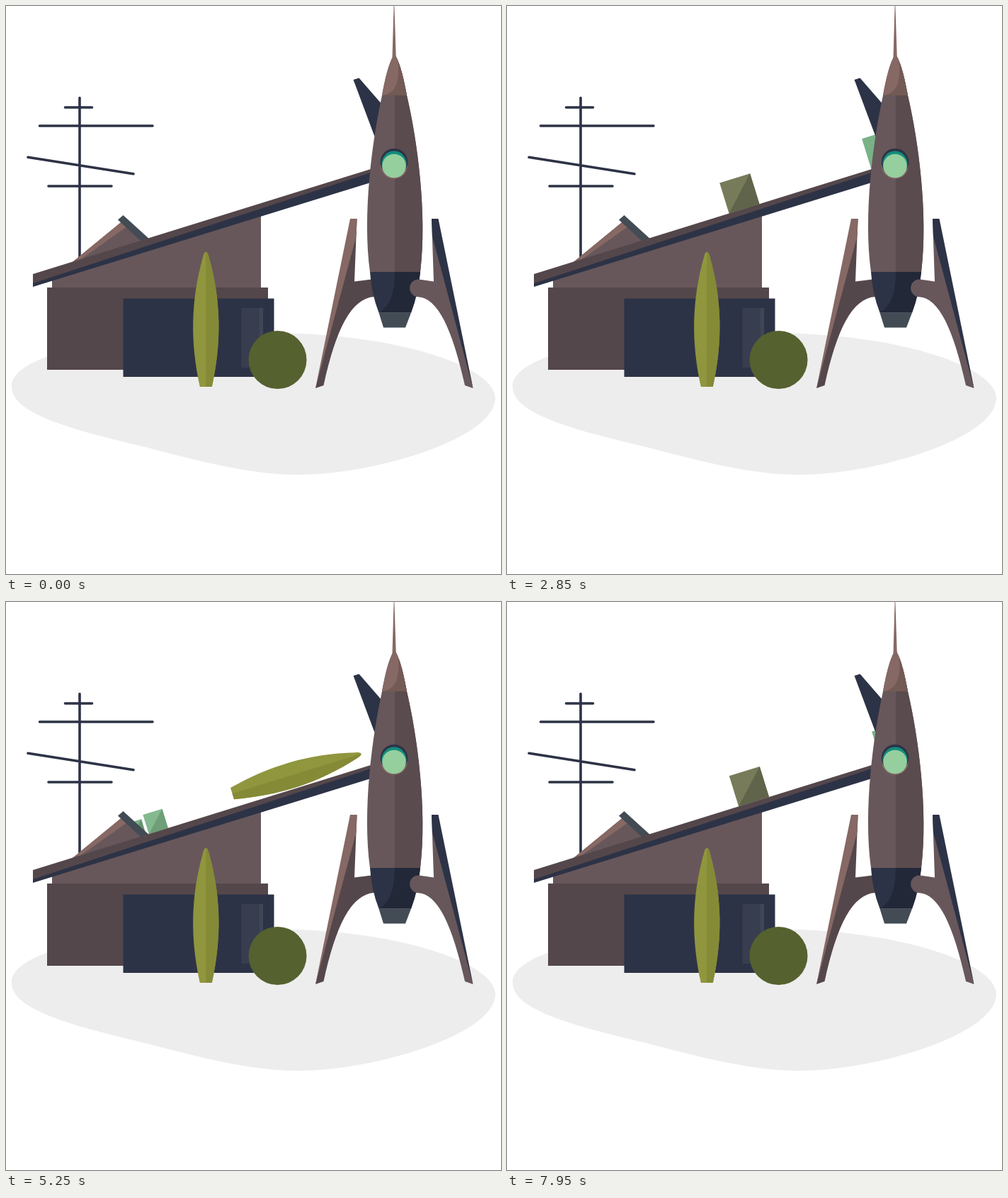
These frames come from a looping animation (699 by 801 pixels, 8000 ms). An HTML page with a canvas:

```html
<!DOCTYPE html>
<html lang="en">
<head>
<meta charset="utf-8">
<title>Rocket loading ramp</title>
<style>
html, body { margin: 0; width: 100%; height: 100%; overflow: hidden; background: #fff; }
canvas { display: block; }
</style>
</head>
<body>
<canvas id="stage" width="699" height="801"></canvas>
<script>
const ctx = document.getElementById('stage').getContext('2d');

const LOOP = 8;
const SPEED = 134.5;
const START_X = 178.2;
const TILT = Math.atan2(148, 477);
const NAVY = '#2d3346', PLUM = '#67575b', DARK = '#54474b', ROSE = '#866864', STEEL = '#434b54';

const rampY = x => 378 - (x - 38) * 148 / 477;

function fill(color, d) {
  ctx.fillStyle = color;
  ctx.fill(new Path2D(d));
}

function rect(color, x, y, w, h) {
  ctx.fillStyle = color;
  ctx.fillRect(x, y, w, h);
}

function disc(color, x, y, r) {
  ctx.fillStyle = color;
  ctx.beginPath();
  ctx.arc(x, y, r, 0, 2 * Math.PI);
  ctx.fill();
}

// Grows from 0 to 1 with a small overshoot
function pop(age) {
  const q = Math.min(age / 0.45, 1) - 1;
  return 1 + 2.4 * q ** 3 + 1.4 * q * q;
}

function smooth(a, b, t) {
  const p = Math.max(0, Math.min(1, (t - a) / (b - a)));
  return p * p * (3 - 2 * p);
}

const GREEN = ['#79b287', '#62956b'];
const MINT = ['#84b990', '#6e9f78'];
const OLIVE = ['#777b5a', '#60644a'];

const boxes = [
  { at: 0.191, size: 45, colors: GREEN },
  { at: 1.685, size: 45, colors: OLIVE },
  { at: 5.187, size: 45, colors: GREEN },
  { at: 4.975, size: 26.5, colors: MINT },
  { at: 6.684, size: 45, colors: OLIVE }
];

function drawBox({ at, size, colors }, t) {
  const age = t - at;
  const x = START_X + SPEED * age;
  if (age <= 0 || x > 560) return;
  const k = pop(age) * size, h = k / 2;
  ctx.save();
  ctx.translate(x, rampY(x));
  ctx.rotate(-TILT);
  rect(colors[0], -h, -k, k, k);
  fill(colors[1], `M${h} ${-k}V0H${-h}Z`);
  ctx.restore();
}

function treeShape() {
  fill('#90963d', 'M-8.5 0C-22 -62 -22 -120 -4 -184C-2 -192.5 2 -192.5 4 -184C22 -120 22 -62 8.5 0Z');
  fill('#858a37', 'M0 0V-190.5Q2.3 -190 4 -184C22 -120 22 -62 8.5 0Z');
}

function drawCargoTree(t) {
  const age = t - 3.18;
  if (age <= 0 || t > 7) return;
  const u = t - 5.25;
  const x = 429.3 + 145.2 * u - 3.4 * u * u;
  const y = 236.3 - 0.306 * (x - 429.3);
  const tilt = 28 - 10.9 * smooth(3.8, 4.8, t);
  const k = pop(age);
  ctx.save();
  ctx.translate(x, y);
  ctx.rotate((90 - tilt) * Math.PI / 180);
  ctx.scale(k, k);
  ctx.translate(0, 115);
  treeShape();
  ctx.restore();
}

function drawCargo(t) {
  ctx.save();
  ctx.beginPath();
  ctx.rect(178, 100, 370, 300);
  ctx.clip();
  boxes.forEach(b => drawBox(b, t));
  ctx.restore();

  ctx.save();
  ctx.beginPath();
  ctx.rect(90, 100, 458, 300);
  ctx.clip();
  drawCargoTree(t);
  ctx.restore();
}

function drawGround() {
  fill('#ededed', 'M8 537C8 500 100 462 380 461C560 463 691 510 691 553C691 610 520 661 412 661C330 661 240 632 180 618C80 594 8 572 8 537Z');
}

function drawAntenna() {
  ctx.strokeStyle = NAVY;
  ctx.lineWidth = 3.6;
  ctx.lineCap = 'round';
  ctx.stroke(new Path2D('M104 129.5V360M83.5 143H121.5M47.5 169H207M31 213.3L180 236.8M60 254H149'));
}

function drawHouse() {
  // Tunnel
  fill(PLUM, 'M94 361L163 304.5L200 332L150 356Z');
  fill(ROSE, 'M94 361L163 304.5L171 311L106 357Z');
  fill(STEEL, 'M158 301.5L165.5 295L204 330L190 331Z');
  // Walls and ramp
  fill(PLUM, 'M65 398V380L360 288V398Z');
  fill(NAVY, 'M38 390L515 234V249L38 396Z');
  fill(DARK, 'M38 378L515 230V235L38 391Z');
  rect(DARK, 58, 397, 312, 116);
  rect(NAVY, 165.5, 412.5, 213, 110.5);
  rect('#383d50', 332.5, 426, 30.5, 84);
  rect('#3f4755', 358, 426, 5, 84);
  // Plants
  ctx.save();
  ctx.translate(282.3, 537);
  treeShape();
  ctx.restore();
  disc('#55612f', 383.5, 499, 41);
}

function drawRocket() {
  const body = 'M547 70C540 82 535 104 531 126C517 190 503 294 514 375H585C595 294 581 190 566 126C562 104 557 82 550 70Z';
  fill(NAVY, 'M490.5 104L498.5 101.5L532 140L520.5 184Z');

  // Left leg
  fill(DARK, 'M495.5 300L492 388.5Q503 387 520 385V410C488 412 466 455 448.5 535L437 539Z');
  fill(ROSE, 'M486 300H495.8L494.5 325L437 539Z');

  // Hull
  fill(PLUM, body);
  ctx.save();
  ctx.clip(new Path2D(body));
  rect('#594b4e', 549, 60, 50, 320);
  rect(ROSE, 520, 60, 60, 66);
  fill('#745a55', 'M553 70C556 100 555 123 531 126H570V70Z');
  ctx.restore();
  fill(ROSE, 'M545.5 73L547.6 0H548.4L550.8 73Z');

  // Engine
  fill(NAVY, 'M514 375H585Q582 406 572 432.5H526.5Q516 406 514 375Z');
  fill('#232838', 'M549 375H585Q582 406 572 432.5H526.5C542 424 549 404 549 375Z');
  fill(STEEL, 'M526.5 432.5H572L564 453.5H533Z');

  // Porthole
  disc(ROSE, 548, 224.8, 19);
  disc(NAVY, 548, 220.2, 19.3);
  disc('#128c7c', 548, 222, 17.5);
  disc('#95cf9e', 548, 225.5, 16.8);

  // Right leg
  fill(PLUM, 'M601 300L604 388.5Q594 387 583 385.5A12.3 12.3 0 0 0 582 410.2C610 412 630 455 648 535L659.5 539L606 300Z');
  fill(NAVY, 'M601 300H610.5L659.5 539L602 325Z');
}

function frame(now) {
  const t = now / 1000 % LOOP;
  rect('#fff', 0, 0, 699, 801);
  drawGround();
  drawAntenna();
  drawCargo(t);
  drawHouse();
  drawRocket();
  requestAnimationFrame(frame);
}

requestAnimationFrame(frame);
</script>
</body>
</html>
```
